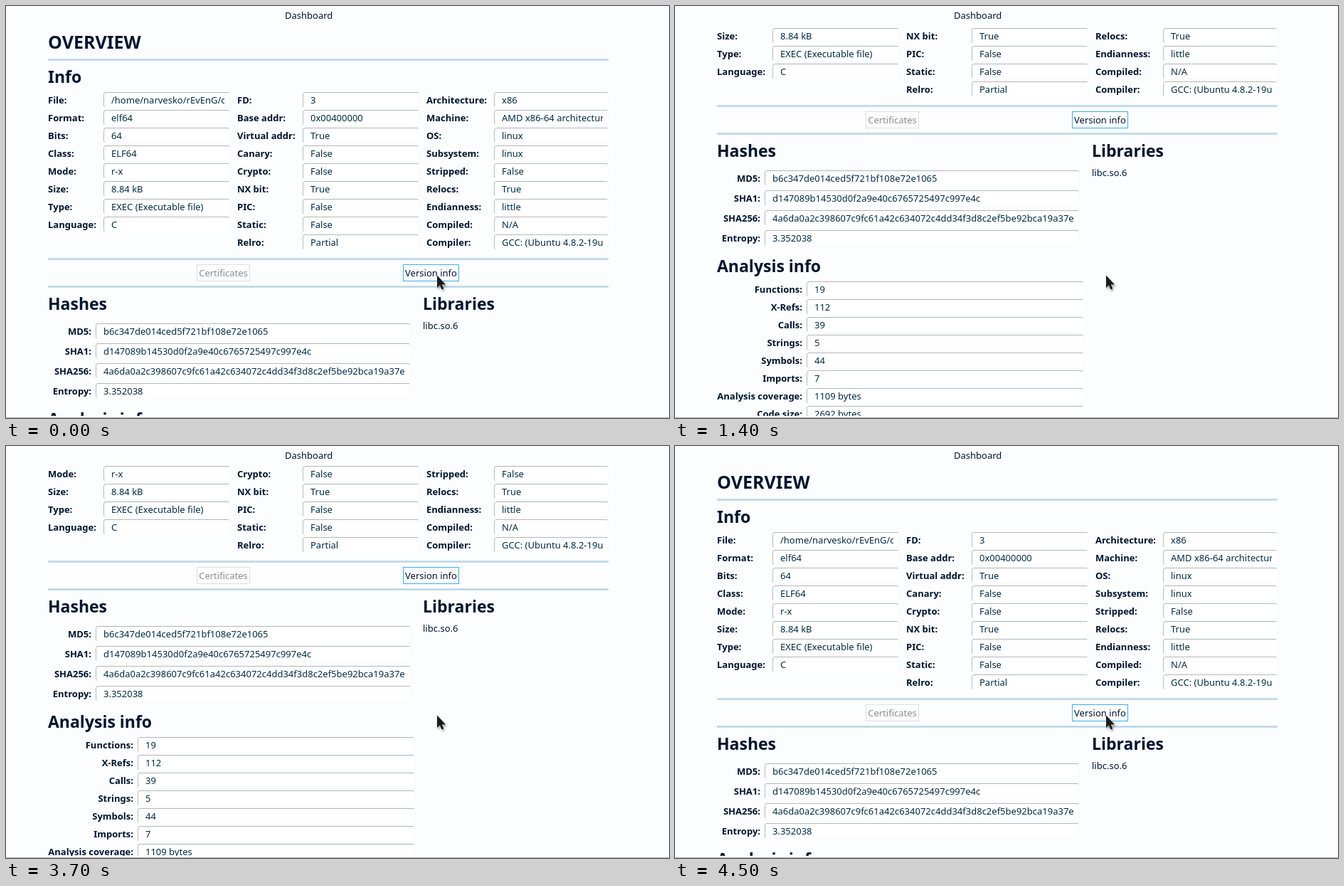
An HTML page for the animation above (6200 ms loop, 932 by 579 pixels).

```html
<!DOCTYPE html>
<html lang="en">
<head>
<meta charset="utf-8">
<title>Dashboard</title>
<style>
html, body { margin: 0; width: 100%; height: 100%; overflow: hidden; background: #fbfdff; }
body { position: relative; font: 13px/18px "Noto Sans", sans-serif; color: #00142d; }
div, svg { position: absolute; box-sizing: border-box; white-space: pre; }
#title { left: 392px; top: 4px; }
#view { left: 0; top: 27px; width: 932px; height: 549px; overflow: hidden; }
#page { left: 0; top: -27px; width: 932px; height: 860px; }
#edge { left: 0; top: 578px; width: 100%; height: 1px; background: #a8abad; }
.rule { left: 59px; width: 788px; height: 3px; background: #c5dbe7; }
.head { font-weight: 700; font-size: 23px; line-height: 32px; }
.head.big { font-size: 25px; line-height: 34px; }
.label { font-weight: 700; }
.field {
  height: 22px; background: #fff; border: 1px solid; border-radius: 4px;
  border-color: #b4b6b8 #f7f9fa #fbfcfd #b9bbbd;
}
.field div { left: 10px; right: 7px; top: 1px; height: 18px; overflow: hidden; color: #002b42; }
.button { top: 363px; height: 24px; border: 1px solid; text-align: center; line-height: 22px; }
#cert { left: 268px; width: 75px; border-color: #dcdedf; color: #8b8c8e; }
#version { left: 558px; width: 79px; border-color: #3daee9; background: #fdfeff; }
#version, #cert { letter-spacing: 0; }
#cursor { left: 600px; top: 373px; filter: drop-shadow(1px 2px 1.5px rgba(0, 0, 0, .35)); }
</style>
</head>
<body>
<div id="title">Dashboard</div>
<div id="view"><div id="page">
  <div class="button" id="cert"><span>Certificates</span></div>
  <div class="button" id="version"><span>Version info</span></div>
</div></div>
<div id="edge"></div>
<svg id="cursor" width="26" height="34" viewBox="0 0 26 34">
  <path d="M6 5.5V23l3.8-3.4 2.7 6 3-1.4-2.7-5.7h5.4Z" fill="#1a1b1d" stroke="#fff" stroke-width="1" paint-order="stroke" stroke-linejoin="round"/>
</svg>
<script>
const LOOP = 6200;
const page = document.getElementById("page");

function add(parent, cls, style, text = "") {
  const el = document.createElement("div");
  el.className = cls;
  for (const key in style) el.style[key] = style[key] + "px";
  el.textContent = text;
  return parent.appendChild(el);
}

function field(left, right, mid, text) {
  const box = add(page, "field", { left, width: right - left, top: mid - 11 });
  add(box, "", {}, text);
}

// Rows of a form; labels start at labelX, or end there when alignRight is set.
function form(rows, { labelX, left, right, mid, step, alignRight }) {
  rows.forEach(([name, value], i) => {
    const y = mid + i * step;
    const side = alignRight ? { right: 932 - labelX } : { left: labelX };
    add(page, "label", { ...side, top: y - 9 }, name + ":");
    field(left, right, y, value);
  });
}

add(page, "head big", { left: 59, top: 33 }, "OVERVIEW");
add(page, "head", { left: 59, top: 83 }, "Info");
add(page, "head", { left: 59, top: 402 }, "Hashes");
add(page, "head", { left: 586, top: 402 }, "Libraries");
add(page, "head", { left: 59, top: 564 }, "Analysis info");
add(page, "", { left: 586, top: 440 }, "libc.so.6");
for (const top of [74, 354, 393]) add(page, "rule", { top });

form([
  ["File", "/home/narvesko/rEvEnG/c"],
  ["Format", "elf64"],
  ["Bits", "64"],
  ["Class", "ELF64"],
  ["Mode", "r-x"],
  ["Size", "8.84 kB"],
  ["Type", "EXEC (Executable file)"],
  ["Language", "C"]
], { labelX: 59, left: 137, right: 315, mid: 132, step: 25 });

form([
  ["FD", "3"],
  ["Base addr", "0x00400000"],
  ["Virtual addr", "True"],
  ["Canary", "False"],
  ["Crypto", "False"],
  ["NX bit", "True"],
  ["PIC", "False"],
  ["Static", "False"],
  ["Relro", "Partial"]
], { labelX: 325, left: 417, right: 581, mid: 132, step: 25 });

form([
  ["Architecture", "x86"],
  ["Machine", "AMD x86-64 architecture"],
  ["OS", "linux"],
  ["Subsystem", "linux"],
  ["Stripped", "False"],
  ["Relocs", "True"],
  ["Endianness", "little"],
  ["Compiled", "N/A"],
  ["Compiler", "GCC: (Ubuntu 4.8.2-19u"]
], { labelX: 591, left: 686, right: 847, mid: 132, step: 25 });

form([
  ["MD5", "b6c347de014ced5f721bf108e72e1065"],
  ["SHA1", "d147089b14530d0f2a9e40c6765725497c997e4c"],
  ["SHA256", "4a6da0a2c398607c9fc61a42c634072c4dd34f3d8c2ef5be92bca19a37e"],
  ["Entropy", "3.352038"]
], { labelX: 120, left: 126, right: 569, mid: 457, step: 28, alignRight: true });

form([
  ["Functions", "19"],
  ["X-Refs", "112"],
  ["Calls", "39"],
  ["Strings", "5"],
  ["Symbols", "44"],
  ["Imports", "7"],
  ["Analysis coverage", "1109 bytes"],
  ["Code size", "2692 bytes"],
  ["Coverage percent", "41%"]
], { labelX: 179, left: 185, right: 575, mid: 613, step: 25, alignRight: true });

// Scroll offsets, one every 100 ms from each start time.
const scrolls = [
  [0, [0]],
  [1000, [50, 95, 138, 179, 215, 238, 250, 254]],
  [3500, [239, 217, 193, 167, 141, 112, 84, 57, 32, 12, 0]]
];
const steps = scrolls.flatMap(([start, list]) => list.map((y, i) => ({
  offset: (start + i * 100) / LOOP,
  transform: `translateY(${-y}px)`,
  easing: "step-end"
})));
steps.push({ offset: 1, transform: "translateY(0px)" });
page.animate(steps, { duration: LOOP, iterations: Infinity });
</script>
</body>
</html>
```
